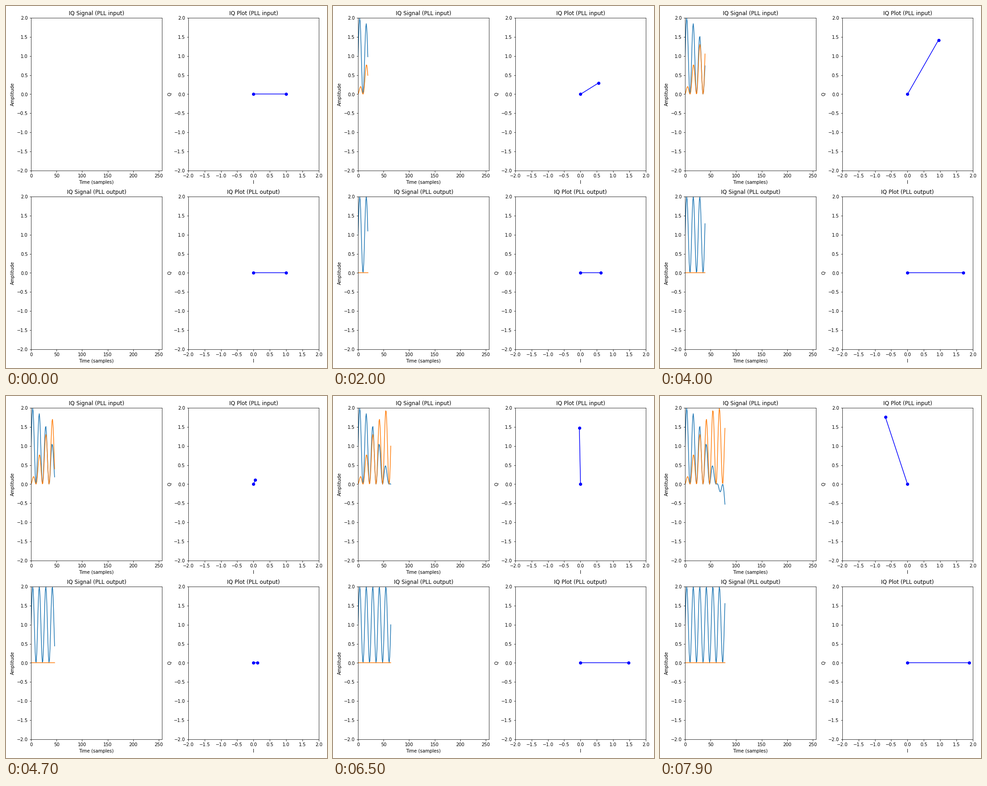
Animation of 706 by 794 pixels, one loop 8000 ms. Source, as a matplotlib script:

```python
import numpy as np
import matplotlib.pyplot as plt
from matplotlib.animation import FuncAnimation

W, H, DPI = 706, 794, 72
FRAMES, INTERVAL = 80, 100
N = 256          # samples along the time axis
CYCLES = 20      # amplitude modulation cycles in N samples

plt.rcParams.update({"font.family": "DejaVu Sans", "font.size": 10})

# Tiny margin keeps the pixel size from being truncated.
fig = plt.figure(figsize=((W + 1e-6) / DPI, (H + 1e-6) / DPI),
                 dpi=DPI, facecolor="white")

t = np.arange(N)
envelope = 1 + np.sin(2 * np.pi * CYCLES * t / N)
pll_in = envelope * np.exp(2j * np.pi * t / N)   # carrier drifts one turn
pll_out = envelope.astype(complex)               # carrier removed


def add_axes(left, bottom, title, xlabel, ylabel, xlim):
    ax = fig.add_axes([left / W, bottom / H, 287.4 / W, 335 / H])
    ax.set(title=title, xlabel=xlabel, ylabel=ylabel, xlim=xlim, ylim=(-2, 2))
    ax.set_yticks(np.arange(-2, 2.1, 0.5))
    return ax


class Row:
    """Time plot and phasor plot of one complex signal."""

    def __init__(self, signal, name, bottom):
        self.signal = signal
        time_ax = add_axes(55.2, bottom, f"IQ Signal ({name})",
                           "Time (samples)", "Amplitude", (0, N))
        iq_ax = add_axes(400.7, bottom, f"IQ Plot ({name})", "I", "Q", (-2, 2))
        iq_ax.set_xticks(np.arange(-2, 2.1, 0.5))
        self.i_line, = time_ax.plot([], [], color="tab:blue")
        self.q_line, = time_ax.plot([], [], color="tab:orange")
        self.phasor, = iq_ax.plot([], [], "bo-")

    def update(self, n):
        past, now = self.signal[:n], self.signal[n]
        self.i_line.set_data(t[:n], past.real)
        self.q_line.set_data(t[:n], past.imag)
        self.phasor.set_data([0, now.real], [0, now.imag])
        return self.i_line, self.q_line, self.phasor


rows = [Row(pll_in, "PLL input", 433), Row(pll_out, "PLL output", 41)]


def update(n):
    return [line for row in rows for line in row.update(n)]


anim = FuncAnimation(fig, update, frames=FRAMES, init_func=lambda: update(0),
                     interval=INTERVAL, repeat=True, repeat_delay=0, blit=False)
plt.show()
```
